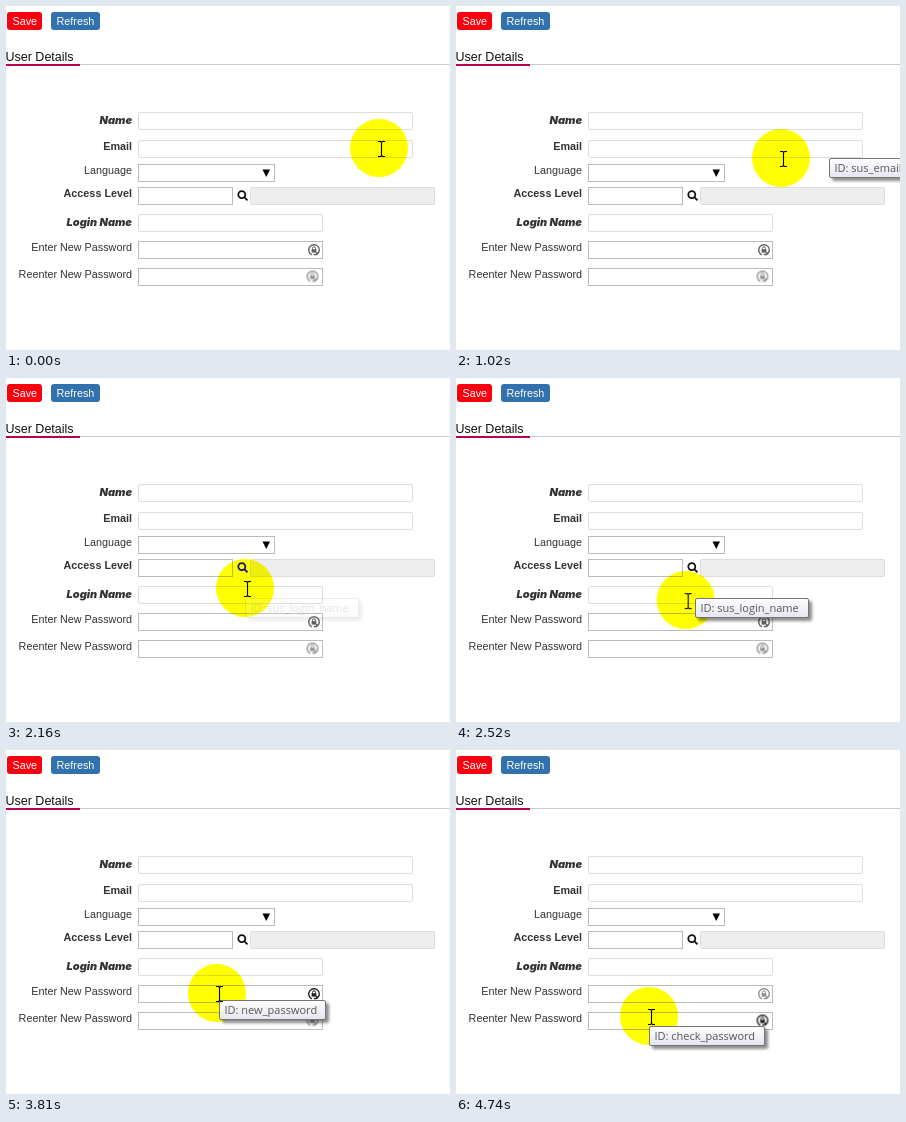
Animation of 444 by 344 pixels, one loop 5.34 s. Source, as an HTML page:

```html
<!DOCTYPE html>
<html lang="en">
<head>
<meta charset="utf-8">
<title>User Details</title>
<style>
  html, body { margin: 0; width: 100%; height: 100%; overflow: hidden; background: #fff; }
  svg { display: block; width: 444px; height: 344px; }
  text { font: 10.8px "Liberation Sans", Arial, sans-serif; fill: #333; }
  .labels { text-anchor: end; }
  .bold { font-weight: 700; }
  .key { font: italic 900 11px Inter, "Liberation Sans", sans-serif; }
  .title { font-size: 12.5px; fill: #111; }
  .button text { fill: #fff; }
  .field { fill: #fff; stroke: #ddd; }
  .strong { stroke: #bbb; }
  .off { fill: #eee; }

  .move, .tip, .lock, .beam, .stop { animation: 5340ms linear infinite; }
  .move { animation-name: move; }
  .invert { fill: #00f; mix-blend-mode: difference; }
  .dim { fill: #ffff96; mix-blend-mode: multiply; }
  .beam { animation-name: beam; animation-timing-function: step-end; }
  .stop { animation-name: stop; animation-timing-function: step-end; }
  .first { animation-name: first; }
  .second { animation-name: second; }

  .tip { opacity: 0; filter: drop-shadow(3px 3px 1.5px rgba(0, 0, 0, .45)); }
  .tip rect { fill: url(#sheen); stroke: #767676; }
  .tip text { font: 11px "Open Sans", "Noto Sans", sans-serif; fill: #575757; }
  .email { animation-name: email; }
  .login { animation-name: login; }
  .fresh { animation-name: fresh; }
  .check { animation-name: check; }

  @keyframes move {
    0%, 3.37% { transform: translate(373px, 142px); }
    8.99%, 12.92% { transform: translate(372px, 142px); }
    19.1%, 23.03% { transform: translate(325px, 152px); }
    26.4% { transform: translate(256px, 191px); }
    32.58%, 33.15% { transform: translate(246px, 203px); }
    35.96%, 43.82% { transform: translate(239px, 210px); }
    50%, 50.56% { transform: translate(222px, 232px); }
    52.81%, 58.43% { transform: translate(213px, 241px); }
    60.11%, 71.35% { transform: translate(211px, 243px); }
    80.9%, 100% { transform: translate(193px, 266px); }
  }
  @keyframes beam { 0%, 28.2% { opacity: 1; } 25.6% { opacity: 0; } }
  @keyframes stop { 0%, 28.2% { opacity: 0; } 25.6% { opacity: 1; } }
  @keyframes first {
    0%, 49% { opacity: .72; }
    52%, 75% { opacity: 1; }
    79%, 100% { opacity: .5; }
  }
  @keyframes second {
    0%, 75% { opacity: .5; }
    79%, 100% { opacity: 1; }
  }
  @keyframes email {
    0%, 3.37% { opacity: 0; }
    7.3%, 27.5% { opacity: 1; }
    31.5%, 100% { opacity: 0; }
  }
  @keyframes login {
    0%, 39.89% { opacity: 0; }
    43.82%, 58.3% { opacity: 1; }
    59.55%, 100% { opacity: 0; }
  }
  @keyframes fresh {
    0%, 58.43% { opacity: 0; }
    60.11%, 82.02% { opacity: 1; }
    85%, 100% { opacity: 0; }
  }
  @keyframes check {
    0%, 85% { opacity: 0; }
    88.7%, 100% { opacity: 1; }
  }
</style>
</head>
<body>
<svg viewBox="0 0 444 344">
  <defs>
    <linearGradient id="sheen" x2="0" y2="1">
      <stop stop-color="#fff"/>
      <stop offset="1" stop-color="#e4e5f0"/>
    </linearGradient>
    <g id="lock">
      <path d="M-2.2 4.8A5.3 5.3 0 1 1 2.8 4.5M2.8 4.5h-3M2.8 4.5v-2.4" fill="none" stroke="#222" stroke-width="1.4"/>
      <path d="M-1.5-.5v-1.2a1.5 1.5 0 0 1 3 0v1.2" fill="none" stroke="#222"/>
      <rect x="-2.4" y="-.8" width="4.8" height="3.4" fill="#222"/>
    </g>
  </defs>
  <rect width="444" height="344" fill="#fff"/>

  <g class="button">
    <rect x="1" y="6" width="35" height="18" rx="3" fill="#f9000f"/>
    <text x="6.5" y="19">Save</text>
    <rect x="45" y="6" width="49" height="18" rx="3" fill="#3071ae"/>
    <text x="50.5" y="19">Refresh</text>
  </g>

  <text class="title" x="-.5" y="55">User Details</text>
  <rect y="58" width="444" height="1" fill="#ccc"/>
  <rect y="58" width="74" height="2" fill="#b80050"/>

  <g class="labels">
    <text class="key" x="126" y="118">Name</text>
    <text class="bold" x="126" y="144">Email</text>
    <text x="126" y="168">Language</text>
    <text class="bold" x="126" y="191">Access Level</text>
    <text class="key" x="126" y="220">Login Name</text>
    <text x="126" y="245">Enter New Password</text>
    <text x="126" y="272">Reenter New Password</text>
  </g>

  <g class="field">
    <rect x="132.5" y="106.5" width="274" height="17" rx="1.5"/>
    <rect x="132.5" y="134.5" width="274" height="17" rx="1.5"/>
    <rect class="strong" x="132.5" y="158.5" width="136" height="17"/>
    <rect class="strong" x="132.5" y="181.5" width="94" height="17"/>
    <rect class="off" x="244.5" y="181.5" width="184" height="17" rx="1.5"/>
    <rect x="132.5" y="208.5" width="184" height="17" rx="1.5"/>
    <rect class="strong" x="132.5" y="235.5" width="184" height="17"/>
    <rect class="strong" x="132.5" y="262.5" width="184" height="17"/>
  </g>
  <path d="M256.5 163.5h7.5l-3.75 7.5z"/>
  <g fill="none" stroke="#111" stroke-width="1.8">
    <circle cx="235.8" cy="188.6" r="3.5"/>
    <path d="M238.3 191.1l3.2 3.2"/>
  </g>
  <g transform="translate(308 244)"><use class="lock first" href="#lock"/></g>
  <g transform="translate(306.5 270.5)"><use class="lock second" href="#lock"/></g>

  <circle class="move invert" r="29"/>
  <circle class="move dim" r="29"/>

  <g class="tip email" >
    <rect x="373.5" y="152.5" width="84" height="19" rx="1.5"/>
    <text x="378.5" y="166">ID: sus_email</text>
  </g>
  <g class="tip login">
    <rect x="239.5" y="220.5" width="113" height="19" rx="1.5"/>
    <text x="244.5" y="234">ID: sus_login_name</text>
  </g>
  <g class="tip fresh">
    <rect x="213.5" y="250.5" width="106" height="19" rx="1.5"/>
    <text x="218.5" y="264">ID: new_password</text>
  </g>
  <g class="tip check">
    <rect x="193.5" y="276.5" width="115" height="19" rx="1.5"/>
    <text x="198.5" y="290">ID: check_password</text>
  </g>

  <g class="move">
    <path class="beam" d="M-1-6.5h2.5l1 1 1-1H6M2.5-5.5v13M-1 8.5h2.5l1-1 1 1H6" fill="none" stroke="#000" stroke-width="1.1"/>
    <g class="stop" stroke="#c4182c" stroke-width="2.4">
      <circle r="7" fill="#fff"/>
      <path d="M-5-5L5 5"/>
    </g>
  </g>
</svg>
</body>
</html>
```
